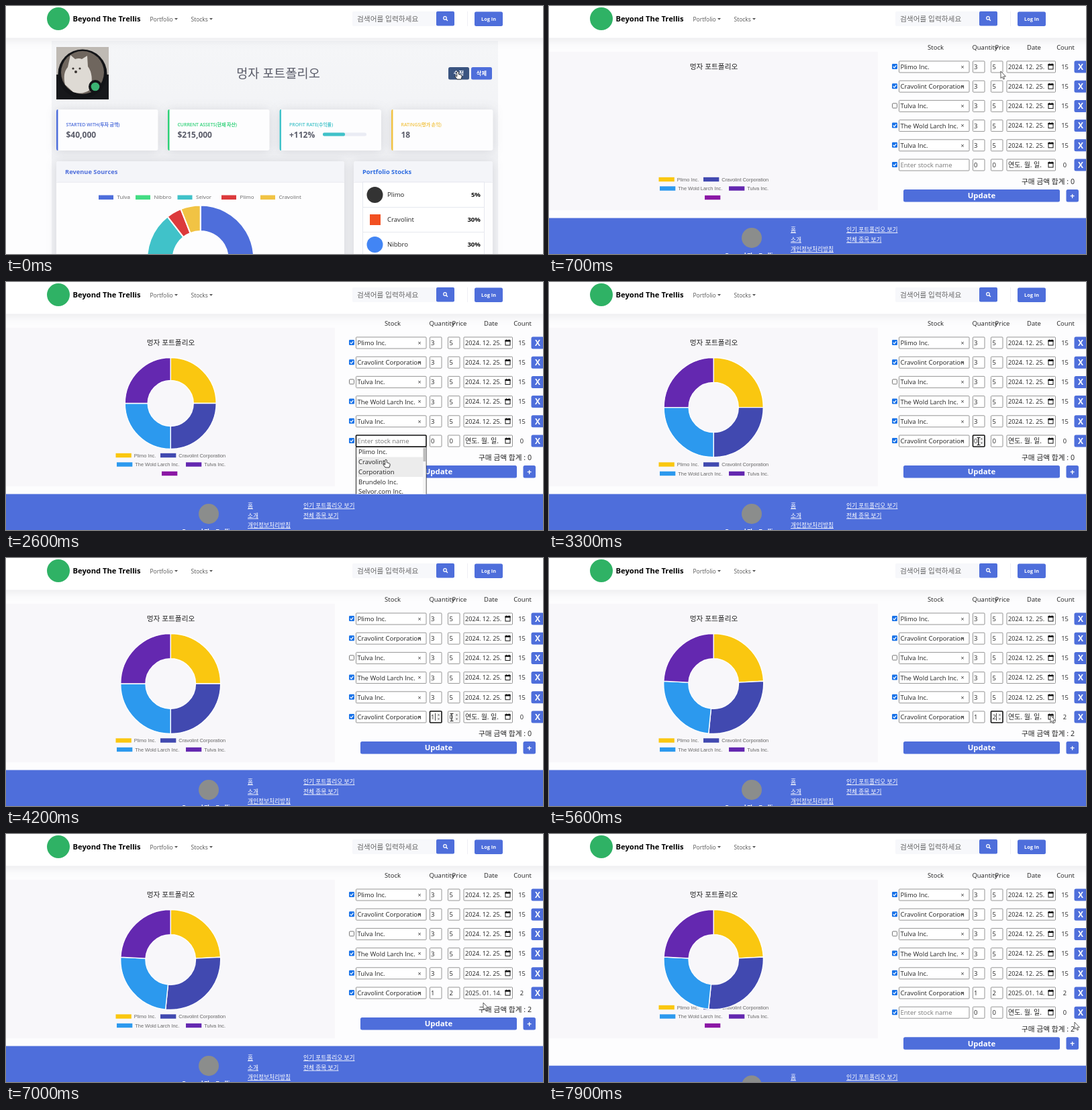
Recreate the animation shown at these times as an HTML page. Size 800 px wide and 369 px high, loop 8000 ms.

```html
<!DOCTYPE html>
<html lang="ko">
<head>
<meta charset="utf-8">
<title>Portfolio editor</title>
<style>
  html, body { margin: 0; width: 100%; height: 100%; overflow: hidden; background: #fdfdfe; }
  svg { display: block; width: 800px; height: 369px; }
  text { font-family: "Open Sans", "Noto Sans CJK KR", "Noto Sans CJK", sans-serif; white-space: pre; }
  .legend text { font-family: "Liberation Sans", Arial, sans-serif; }
  .bar { filter: drop-shadow(0 1px 8px rgba(58, 59, 69, .13)); }
  .card { filter: drop-shadow(0 1px 8px rgba(58, 59, 69, .14)); }
  .link { text-decoration: underline; }
</style>
</head>
<body>
<svg id="stage" viewBox="0 0 800 369"></svg>
<script>
const LOOP = 8000;
const BLUE = '#4e6edb';
const INK = '#222';

// Moments (ms) at which the interface changes
const AT = { page: 700, chart: 760, open: 1900, pick: 2800, qty: 3300, typeQty: 3700,
             price: 4400, typePrice: 4900, leave: 5700, date: 6600, add: 7890 };

const FIRM = { tulva: 'Tulva', nibbro: 'Nibbro', selvor: 'Selvor', plimo: 'Plimo', crav: 'Cravolint' };
const NAMES = ['Plimo Inc.', 'Cravolint Corporation', 'Tulva Inc.', 'The Wold Larch Inc.', 'Tulva Inc.'];
const SITE = 'Beyond The Trellis';
const TITLE = '멍자 포트폴리오';

// ---- drawing helpers ----
const rect = (x, y, w, h, fill, more = '') =>
  `<rect x="${x}" y="${y}" width="${w}" height="${h}" fill="${fill}" ${more}/>`;
const circle = (x, y, r, fill, more = '') =>
  `<circle cx="${x}" cy="${y}" r="${r}" fill="${fill}" ${more}/>`;
const path = (d, fill, more = '') => `<path d="${d}" fill="${fill}" ${more}/>`;
const line = (d, color, w = 1) => path(d, 'none', `stroke="${color}" stroke-width="${w}"`);
// y is the middle of the line of text
const text = (x, y, s, size, fill = INK, more = '') =>
  `<text x="${x}" y="${(y + size * .36).toFixed(2)}" font-size="${size}" fill="${fill}" ${more}>${s}</text>`;
const BOLD = 'font-weight="700"';
const MID = 'text-anchor="middle"';
const END = 'text-anchor="end"';
const button = (x, y, w, h, label, size, fill = BLUE) =>
  rect(x, y, w, h, fill, 'rx="2.5"') +
  text(x + w / 2, y + h / 2, label, size, '#fff', `${MID} ${BOLD}`);

function slice(cx, cy, r, hole, from, to, fill, gap) {
  const point = (rad, deg) => {
    const a = deg * Math.PI / 180;
    return `${(cx + rad * Math.sin(a)).toFixed(2)} ${(cy - rad * Math.cos(a)).toFixed(2)}`;
  };
  const big = to - from > 180 ? 1 : 0;
  return path(`M${point(r, from)}A${r} ${r} 0 ${big} 1 ${point(r, to)}` +
    `L${point(hole, to)}A${hole} ${hole} 0 ${big} 0 ${point(hole, from)}Z`,
    fill, `stroke="#fff" stroke-width="${gap}" stroke-linejoin="bevel"`);
}

function donut(cx, cy, r, hole, parts, colors, gap, sweep = 360) {
  const sum = parts.reduce((a, b) => a + b, 0);
  let at = 0;
  return parts.map((p, i) => {
    const from = at;
    at += p / sum * sweep;
    return slice(cx, cy, r, hole, from, at, colors[i], gap);
  }).join('');
}

// ---- shared top bar ----
function topBar() {
  const caret = x => path(`M${x} 18h5l-2.5 2.8z`, '#555');
  return `<g class="bar">${rect(-20, -20, 840, 67.5, '#fff')}</g>` +
    circle(78, 19, 17, '#2fb265') +
    text(99.5, 18.5, SITE, 11.2, '#000', BOLD) +
    text(214.5, 19.5, 'Portfolio', 8.5, '#555') + caret(251) +
    text(275.5, 19.5, 'Stocks', 8.5, '#555') + caret(303) +
    rect(516, 8, 126, 22, '#f7f8fb', 'rx="2"') +
    text(523, 19, '검색어를 입력하세요', 10.7, '#666') +
    rect(641, 8, 27, 21.5, BLUE, 'rx="2"') +
    circle(654, 18, 2.3, 'none', 'stroke="#fff" stroke-width="1.2"') +
    line('M655.7 19.7l2.3 2.3', '#fff', 1.3) +
    line('M687.5 8V30', '#eeeff4') +
    button(698, 8.5, 42, 21.5, 'Log In', 7.3);
}

// ---- overview page ----
function statCard(x, color, label, value) {
  return `<g class="card">${rect(x, 154, 151.5, 61, '#fdfdfe', 'rx="3"')}</g>` +
    path(`M${x + 2.5} 154h-.5q-2 0-2 3v55q0 3 2 3h.5z`, color) +
    text(x + 14.5, 176.5, label, 6.9, color, 'font-weight="600"') +
    text(x + 14.5, 191.5, value, 12, '#5a5c69', BOLD);
}

// Photo reduced to flat shapes: white dog on a brown ground in a dark ring
function avatar() {
  return rect(75, 61, 78, 78, '#17181b') + rect(75, 61, 78, 41, '#bfbab4') +
    circle(114, 101, 36.5, '#131417') + circle(114, 99, 32, '#6f665e') +
    path('M88 117Q84 100 92 91L96 73L103 79Q109 77 113 79L121 74L122 90Q131 102 126 124Q114 133 100 128Z', '#dedad4') +
    circle(100, 93, 1.6, '#3a3532') + circle(110, 93, 1.6, '#3a3532') + circle(104, 98, 2, '#3a3532') +
    circle(133, 120, 10, '#131417') + circle(133, 120, 6.3, '#3bb273');
}

function overview() {
  const tones = [BLUE, '#43dc83', '#40c2c9', '#dc3a3c', '#f1c344'];
  const key = [[138, FIRM.tulva], [193, FIRM.nibbro], [255.5, FIRM.selvor], [321, FIRM.plimo], [379, FIRM.crav]];
  const stocks = [[FIRM.plimo, '5%'], [FIRM.crav, '30%'], [FIRM.nibbro, '30%']];
  const panel = (x, w, title, color) =>
    `<g class="card">${rect(x, 231, w, 160, '#fdfdfe', 'rx="3"')}</g>` +
    rect(x, 231, w, 31, '#f4f5f9', 'rx="3"') + line(`M${x} 262.2h${w}`, '#e8eaf0') +
    text(x + 13, 247, title, 9.3, color, BOLD);

  return rect(68, 52, 665, 330, 'url(#haze)') + avatar() +
    text(405.5, 100, TITLE, 18.6, '#5a5c69', MID) +
    button(659, 91, 31, 18.5, '수정', 8.3, '#3a5480') +
    button(693, 91, 31, 18.5, '삭제', 8.3) +
    statCard(75, BLUE, 'STARTED WITH(투자 금액)', '$40,000') +
    statCard(241, '#2fd178', 'CURRENT ASSETS(현재 자산)', '$215,000') +
    statCard(407.5, '#40c2c9', 'PROFIT RATE(수익률)', '+112%') +
    statCard(574, '#f1c344', 'RATINGS(평가 손익)', '18') +
    rect(472, 188.5, 65, 5, '#eaecf4', 'rx="2.5"') +
    rect(472, 188.5, 33, 5, '#40c2c9', 'rx="2"') +
    panel(75, 429, 'Revenue Sources', BLUE) +
    panel(518, 207, 'Portfolio Stocks', '#2d6be0') +
    key.map(([x, s], i) => rect(x, 281.5, 22, 6.5, tones[i]) + text(x + 27.5, 284.5, s, 8, '#666')).join('') +
    donut(289.7, 376, 79.5, 41, [33, 22, 34.4, 4.6, 6], tones, 2) +
    rect(531.5, 262, 181, 130, '#fff', 'stroke="#e6e8ef"') +
    stocks.map(([s, share], i) => {
      const y = 281 + i * 37;
      return line(`M531.5 ${y + 18.5}h181`, '#e6e8ef') +
        text(568, y, s, 9.6) + text(707, y, share, 9.6, '#111', `${BOLD} ${END}`);
    }).join('') +
    circle(549.5, 281, 12, '#333') + rect(542, 310, 16, 16, '#f25022') + circle(549.5, 355, 12, '#4285f4');
}

// ---- editor page ----
const TONES = ['#fac710', '#4149b0', '#2c99ee', '#6428b0', '#8b17a5'];

function row(i, r) {
  const y = 90.5 + i * 29.2;
  const field = (x, w, name) => {
    const on = r.focus === name;
    return rect(x, y - 8.5, w, 17, '#fff',
      `rx="1" stroke="${on ? '#111' : '#8a8a8a'}" stroke-width="${on ? 1.6 : .9}"`);
  };
  const spinner = x => rect(x - 3, y - 6, 6, 12, '#efefef') +
    path(`M${x - 1.5} ${y - 2.2}h3l-1.5-2zM${x - 1.5} ${y + 2.2}h3l-1.5 2z`, '#555');
  const box = r.off
    ? rect(511.5, y - 4, 7, 7, '#fff', 'rx="1.2" stroke="#767676"')
    : rect(511, y - 4.5, 8, 8, '#1a73e8', 'rx="1.3"') + line(`M512.7 ${y - .4}l1.7 1.8 3-3.6`, '#fff', 1.2);
  const cal = rect(744, y - 3.5, 7, 7, 'none', 'stroke="#111" stroke-width="1"') +
    rect(743.5, y - 4.2, 8, 2.4, '#111') + line(`M745.5 ${y - 5}v2M749.5 ${y - 5}v2`, '#111', .9);
  return box + field(521.5, 104.5, 'stock') +
    text(523.5, y, r.name || 'Enter stock name', 9.5, r.name ? INK : '#777') +
    (r.name ? text(616, y, '×', 9, '#333', MID) : '') +
    field(631.5, 17.5, 'qty') + text(633, y, r.qty, 9.5) +
    field(658.5, 17.5, 'price') + text(660.5, y, r.price, 9.5) +
    (r.focus === 'qty' ? line(`M639.5 ${y - 5.5}v11`, '#111', .8) + spinner(644.5) : '') +
    (r.focus === 'price' ? line(`M666.5 ${y - 5.5}v11`, '#111', .8) : '') +
    (r.focus === 'price' || r.hover ? spinner(671.5) : '') +
    field(682, 72.5, 'date') + text(684, y, r.date || '연도. 월. 일.', r.date ? 9.2 : 10) + cal +
    text(768.5, y, r.count, 9.3, INK, MID) +
    button(782.5, y - 9, 19, 18, 'X', 12);
}

function menu() {
  const items = [[253, NAMES[0]], [268, FIRM.crav], [283, 'Corporation'], [297.5, 'Brundelo Inc.'], [312, FIRM.selvor + '.com Inc.']];
  return '<g clip-path="url(#fold)">' + rect(521.5, 245.5, 104.5, 90, '#fff', 'stroke="#222"') +
    rect(522, 260.5, 99, 29.5, '#ececec') + rect(621, 246, 4.5, 80, '#f4f4f4') +
    rect(621.5, 247, 4, 20, '#bdbdbd') +
    items.map(([y, s]) => text(525, y, s, 9.5)).join('') + '</g>';
}

function legend(five) {
  const spots = [[163.5, 0, NAMES[0]], [230, 0, NAMES[1]], [165, 1, NAMES[3]], [268, 1, NAMES[4]], [232, 2, '']];
  const top = five ? 258 : 271.5;
  return '<g class="legend">' + spots.slice(0, five ? 5 : 4).map(([x, level, s], i) => {
    const y = top + level * 13.5;
    return rect(x, y - 3.2, 23.3, 6.4, TONES[i]) + text(x + 27.3, y, s, 7.4, '#666');
  }).join('') + '</g>';
}

function footer() {
  const link = (x, y, s) => text(x, y, s, 8.7, '#fff', 'class="link"');
  return rect(0, 315.5, 800, 90, BLUE) + circle(302, 345, 15, '#8b8d8c') +
    text(300, 371, SITE, 8.3, '#fff', `${BOLD} ${MID}`) +
    link(360, 333, '홈') + link(360, 347.5, '소개') + link(360, 362, '개인정보처리방침') +
    link(443, 333, '인기 포트폴리오 보기') + link(443, 347.5, '전체 종목 보기');
}

function editorBase() {
  const heads = [[576, 'Stock'], [649.5, 'Quantity'], [675.5, 'Price'], [722.5, 'Date'], [769.5, 'Count']];
  return rect(0, 68, 490, 236, '#f8f7fa') + text(245.5, 90, TITLE, 10.7, INK, MID) +
    heads.map(([x, s]) => text(x, 62, s, 9.5, INK, MID)).join('') +
    NAMES.map((name, i) => row(i, { name, qty: 3, price: 5, date: '2024. 12. 25.', count: 15, off: i === 2 })).join('');
}

function editorForm(s) {
  const blank = { qty: 0, price: 0, count: 0 };
  const shift = s.added ? 29.2 : 0;
  return legend(s.five) + row(5, s) + (s.added ? row(6, blank) : '') +
    `<g transform="translate(0 ${shift})">` +
    text(783, 261, `구매 금액 합계 : ${s.count}`, 10.7, INK, END) +
    button(528, 273, 233, 18.5, 'Update', 11.4) + button(770.5, 273, 18.5, 18.5, '+', 12) +
    footer() + '</g>' + (s.focus === 'stock' ? menu() : '');
}

function formState(t) {
  const focus = t < AT.open ? '' : t < AT.pick ? 'stock' : t < AT.qty ? '' :
    t < AT.price ? 'qty' : t < AT.leave ? 'price' : '';
  return {
    name: t >= AT.pick ? NAMES[1] : '',
    qty: t >= AT.typeQty ? 1 : 0,
    price: t >= AT.typePrice ? 2 : 0,
    count: t >= AT.typePrice ? 2 : 0,
    date: t >= AT.date ? '2025. 01. 14.' : '',
    five: t < AT.pick || t >= AT.add,
    added: t >= AT.add,
    hover: t >= 4100 && t < AT.price,
    focus
  };
}

// ---- motion ----
const clamp = v => Math.min(1, Math.max(0, v));
const outQuart = (t, start) => 1 - (1 - clamp((t - start) / 1000)) ** 4;
const mix = (a, b, k) => a + (b - a) * k;

function chart(t) {
  const grow = outQuart(t, AT.chart);
  if (!grow) return '';
  const small = grow - outQuart(t, AT.pick) + outQuart(t, AT.add);
  const r = mix(74.5, 68, small);
  const second = 15 + 2 * outQuart(t, AT.typePrice);
  return donut(245.2, 112.5 + r, r, r / 2, [15, second, 15, 15], TONES, 1.4, 360 * grow - .01);
}

const POINTERS = {
  hand: path('M-1.3 1Q0-1 1.3 1V4.6L5 5.7Q6.6 6.4 6 9L5 12H-1L-4 8Q-4.5 6.4-3 6.7L-1.3 8Z', '#fff', 'stroke="#111" stroke-width=".8"'),
  beam: line('M-2.5-5.5H2.5M0-5.5V5.5M-2.5 5.5H2.5', '#222', 1.1),
  arrow: path('M0 0V10.5L2.4 8.4 4 12 5.6 11.3 4.1 7.8H7.4Z', '#fff', 'stroke="#333" stroke-width=".8"')
};
const TRACK = [
  [0, 673, 97, 'hand'], [700, 673, 97, 'arrow'], [1150, 555, 205, 'beam'], [1300, 555, 205, 'beam'],
  [1700, 566, 237, 'beam'], [2100, 566, 237, 'arrow'], [2500, 566, 264, 'hand'], [2900, 566, 264, 'arrow'],
  [3250, 640, 237, 'beam'], [3850, 640, 237, 'beam'], [4150, 664, 237, 'beam'], [5100, 664, 237, 'arrow'],
  [5550, 747, 234, 'arrow'], [6200, 747, 234, 'arrow'], [6650, 711, 251, 'arrow'], [7100, 711, 251, 'arrow'],
  [7600, 783, 280, 'arrow'], [LOOP, 783, 280, 'arrow']
];

function pointer(t) {
  const i = TRACK.findIndex((p, n) => t < TRACK[n + 1][0]);
  const [t0, x0, y0, kind] = TRACK[i];
  const [t1, x1, y1] = TRACK[i + 1];
  const p = (t - t0) / (t1 - t0);
  const k = p * p * (3 - 2 * p);
  return `<g transform="translate(${mix(x0, x1, k)} ${mix(y0, y1, k)})">${POINTERS[kind]}</g>`;
}

// ---- stage ----
const stage = document.getElementById('stage');
stage.innerHTML = `<defs><clipPath id="fold">${rect(500, 240, 150, 75.5, '#000')}</clipPath>` +
  '<linearGradient id="haze" x2="0" y2="1"><stop stop-color="#f5f6f8"/><stop offset=".5" stop-color="#f1f2f5"/></linearGradient></defs>' +
  rect(0, 0, 800, 369, '#fdfdfe') +
  `<g id="overview">${overview()}</g>` +
  `<g id="editor">${editorBase()}<g id="form"></g><g id="chart"></g></g>` +
  topBar() + '<g id="pointer"></g>';
const part = id => document.getElementById(id);
const view = { overview: part('overview'), editor: part('editor'), form: part('form'), chart: part('chart'), pointer: part('pointer') };
const drawn = {};

function put(id, markup) {
  if (drawn[id] !== markup) view[id].innerHTML = drawn[id] = markup;
}

function render(t) {
  const editing = t >= AT.page;
  view.overview.style.display = editing ? 'none' : '';
  view.editor.style.display = editing ? '' : 'none';
  if (editing) {
    put('form', editorForm(formState(t)));
    put('chart', chart(t));
  }
  put('pointer', pointer(t));
}

const start = performance.now();
function tick() {
  render((performance.now() - start) % LOOP);
  requestAnimationFrame(tick);
}
tick();
</script>
</body>
</html>
```
